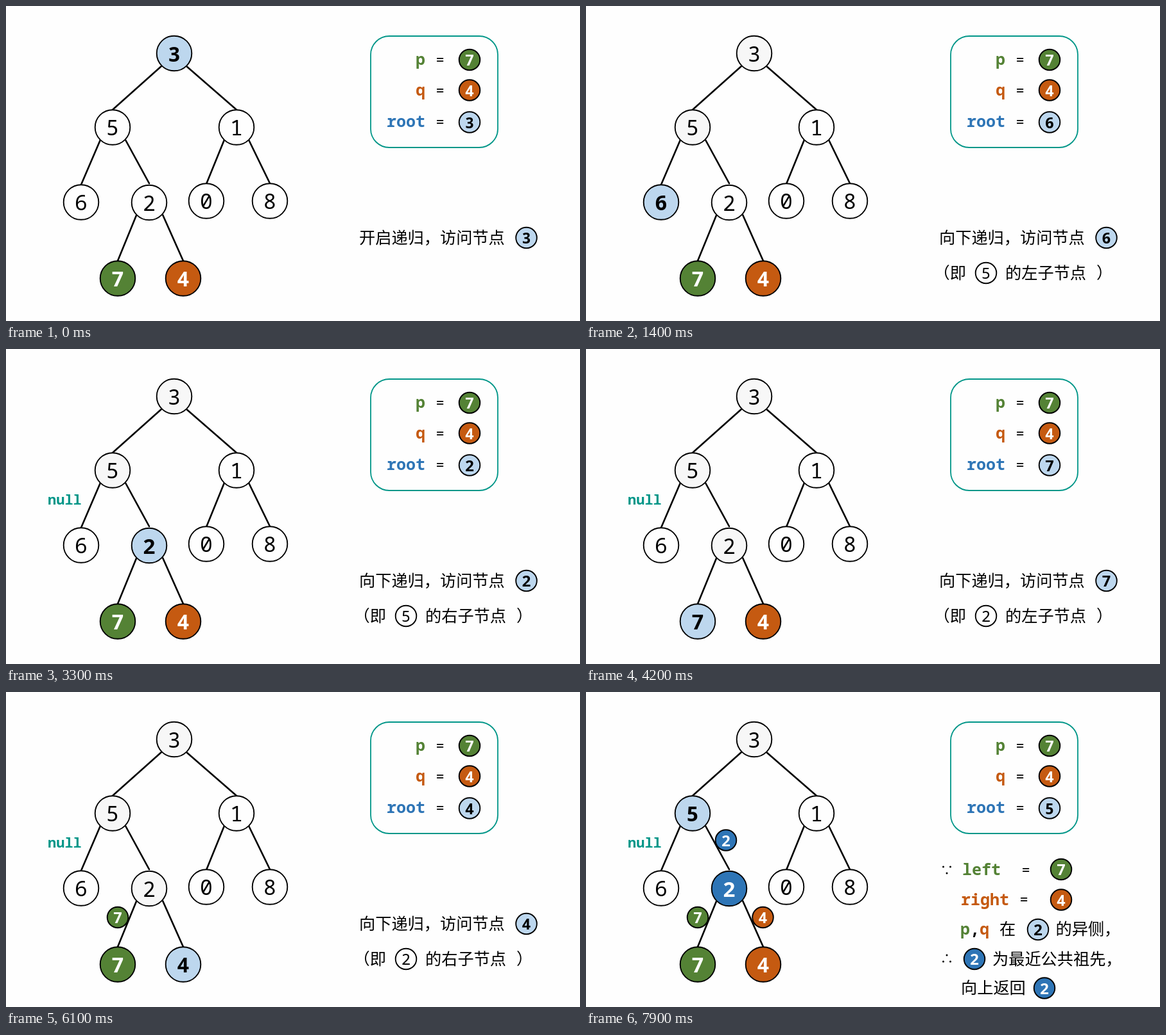
Recreate the animation shown at these times as an HTML page. Size 894 by 492 pixels, loop 8000 ms.

```html
<!DOCTYPE html>
<html lang="zh-CN">
<head>
<meta charset="utf-8">
<title>Lowest common ancestor</title>
<style>
  html, body { margin: 0; width: 100%; height: 100%; overflow: hidden; background: #fefefe; }
  svg { display: block; width: 894px; height: 492px; }
  text { font-family: "Noto Sans Mono", "DejaVu Sans Mono", monospace; font-size: 25px; white-space: pre; }
  .cn { font-family: "Noto Sans CJK SC", "Noto Sans CJK", sans-serif; font-size: 25.2px; font-weight: 300; }
</style>
</head>
<body>
<svg id="stage" viewBox="0 0 894 492"></svg>
<script>
const GREEN = '#548235', ORANGE = '#c55a11', BLUE = '#2e75b6', SKY = '#bdd7ee', TEAL = '#009688';
const LOOP = 8000;
const stage = document.getElementById('stage');

const nodes = {
  3: [262, 74], 5: [166, 189.5], 1: [359, 189.5], 6: [117, 306.5], 2: [223, 307],
  0: [312, 304.5], 8: [411, 304.5], 7: [174, 425.5], 4: [276, 425.5]
};
const edges = 'M242 94L166 162M281 94L359 162M147 209L117 279M186 209L223 277' +
  'M340 209L312 278M378 209L411 277M203 327L174 398M244 326L276 398';

const disc = (x, y, label, fill, bold, r, size) => {
  const ink = [GREEN, ORANGE, BLUE].includes(fill) ? '#fff' : '#000';
  return `<circle cx="${x}" cy="${y}" r="${r}" fill="${fill}" stroke="#000" stroke-width="1.9"/>` +
    `<text x="${x}" y="${y + size * 0.38}" text-anchor="middle" fill="${ink}" ` +
    `style="font-size:${size}px;font-weight:${bold ? 700 : 400}">${label}</text>`;
};
const small = (x, y, label, fill = SKY, bold = true) => disc(x, y, label, fill, bold, 16.3, 24);
const mono = (x, y, s, color, size = 25) =>
  `<text x="${x}" y="${y}" fill="${color}" style="font-weight:700;font-size:${size}px">${s}</text>`;
const cn = (x, y, s) => `<text class="cn" x="${x}" y="${y}">${s}</text>`;
const equals = (x, y) =>
  `<text x="${x}" y="${y + 8}" text-anchor="middle" style="font-size:22px">=</text>`;

// Because (dir 1) and therefore (dir -1) signs
const dots = (x, y, dir) => [[-5.5, -5], [5.5, -5], [0, 5]].map(([dx, dy]) =>
  `<circle cx="${x + dx}" cy="${y + dy * dir}" r="1.5"/>`).join('');

const descend = (node, parent, side) =>
  cn(550, 371, '向下递归，访问节点') + small(810.5, 362, node) +
  cn(541.5, 426, '（即') + small(623, 417, parent, '#fefefe', false) +
  cn(653, 426, `的${side}子节点`) + cn(795, 426, '）');
const giveBack = (reason, value) =>
  dots(528, 358, 1) + reason + dots(528, 406, -1) + cn(552.5, 415, '终止递归，向上返回') + value;
const found = (name, label, color) => giveBack(
  mono(552, 368, name, color) + equals(590, 360) + small(627.5, 360, label),
  small(811.5, 406, label, color));

const answer = () =>
  dots(562, 278, 1) + mono(586, 286, 'left', GREEN) + equals(685, 278) + small(740, 277, 7, GREEN) +
  mono(584, 333, 'right', ORANGE) + equals(682, 324) + small(740, 324.5, 4, ORANGE) +
  mono(583, 379, 'p', GREEN) + mono(598, 379, ',', '#000') + mono(613, 379, 'q', ORANGE) +
  cn(644, 379, '在') + small(704, 371, 2) + cn(731.5, 379, '的异侧，') +
  dots(562, 416, -1) + small(605, 417, 2, BLUE) + cn(633, 426, '为最近公共祖先，') +
  cn(584, 471, '向上返回') + small(714, 462.5, 2, BLUE);

// Each step: start time, current node, its ancestors, returned values, note
const steps = [
  [0, 3, [], '', cn(550, 371, '开启递归，访问节点') + small(810.5, 362, 3)],
  [500, 5, [3], '', descend(5, 3, '左')],
  [1400, 6, [3, 5], '', descend(6, 5, '左')],
  [2400, 5, [3], 'n', giveBack(cn(552.5, 368, '越过叶节点') + small(705.5, 362, 6), mono(797, 414, 'null', TEAL))],
  [3300, 2, [3, 5], 'n', descend(2, 5, '右')],
  [4200, 7, [3, 5, 2], 'n', descend(7, 2, '左')],
  [5100, 2, [3, 5], 'n7', found('p', 7, GREEN)],
  [6100, 4, [3, 5, 2], 'n7', descend(4, 2, '右')],
  [7000, 2, [3, 5], 'n74', found('q', 4, ORANGE)],
  [7900, 5, [3], 'n742', answer()]
];

const returned = {
  n: mono(65, 243, 'null', TEAL, 22),
  7: small(174, 352, 7, GREEN),
  4: small(275.5, 352, 4, ORANGE),
  2: small(218, 231.5, 2, BLUE)
};

const panel = root =>
  `<rect x="568" y="47" width="198" height="174" rx="29" fill="none" stroke="${TEAL}" stroke-width="1.8"/>` +
  mono(638, 92, 'p', GREEN) + equals(676, 84) + small(722, 84, 7, GREEN) +
  mono(638, 140, 'q', ORANGE) + equals(676, 131.5) + small(722, 131.5, 4, ORANGE) +
  mono(593, 189, 'root', BLUE) + equals(676, 181) + small(722, 181.5, root);

function draw([, current, path, back, note]) {
  const fillOf = n =>
    n === current ? SKY : n === 7 ? GREEN : n === 4 ? ORANGE :
    n === 2 && back.includes('2') ? BLUE : path.includes(n) ? '#f7f7f7' : '#fefefe';
  const tree = Object.entries(nodes).map(([key, [x, y]]) => {
    const fill = fillOf(+key);
    return disc(x, y, key, fill, fill[1] !== 'f', 27.3, 33);
  }).join('');
  stage.innerHTML = `<path d="${edges}" stroke="#000" stroke-width="2.6" stroke-linecap="round"/>` +
    tree + [...back].map(k => returned[k]).join('') + panel(current) + note;
}

let shown;
function tick() {
  const t = performance.now() % LOOP;
  const step = steps.findLast(s => s[0] <= t);
  if (step !== shown) draw(shown = step);
  requestAnimationFrame(tick);
}
tick();
</script>
</body>
</html>
```
